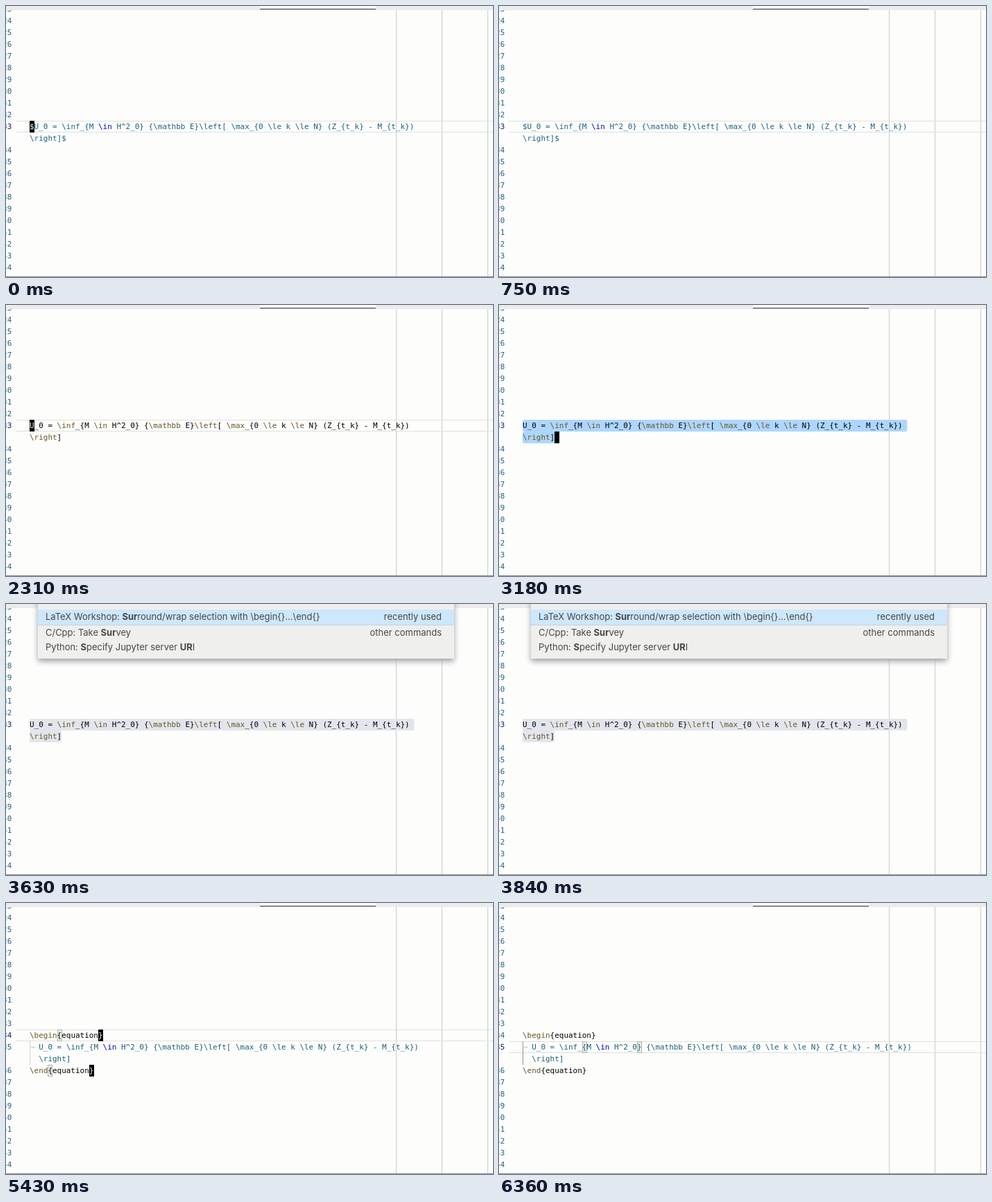
Animation of 702x392 px, one loop 6390 ms. Source, as an HTML page with a canvas:

```html
<!DOCTYPE html>
<html lang="en">
<head>
<meta charset="utf-8">
<title>Wrapping a formula in an environment</title>
<style>
  html, body { margin: 0; width: 702px; height: 392px; overflow: hidden; background: #fdfdfc; }
  canvas { display: block; }
</style>
</head>
<body>
<canvas id="stage" width="702" height="392"></canvas>
<script>
const ctx = document.getElementById('stage').getContext('2d');
const W = 702, H = 392, LOOP = 6390;
const LEFT = 34, CHAR = 6.6, ROW = 17, TOP = -4, FIRST = 23;
const MONO = '10.96px "DejaVu Sans Mono", monospace';
const UI = '12.97px Inter, sans-serif';
const C = {
  bg: '#fdfdfc', bar: '#ececec', ruler: '#cbcbc6', edge: '#8c8c8c',
  number: '#1f6680', active: '#0b216f', line: '#e0e0de',
  ink: '#000', command: '#6a5424', math: '#1c627c', keyword: '#0000c8',
  selected: '#add6ff', inactive: '#e2e5ec', match: '#e7efe6', box: '#b2b2b2',
  guide: '#d3d3d3', activeGuide: '#939393', space: '#c4c4c4',
  panel: '#efefee', focus: '#cde7fc', label: '#464646'
};

// Moments of the editing session, in ms
const T = {
  unwrap: 1300, selectRow: 2400, selectAll: 2760,
  open: 3450, wrap: 4230, type: 4800, key: 68, down: 5760
};
const FORMULA = 'U_0 = \\inf_{M \\in H^2_0} {\\mathbb E}\\left[ \\max_{0 \\le k \\le N} (Z_{t_k} - M_{t_k})';
const TAIL = '\\right]';
const ENV = 'equation';

const rowTop = row => TOP + (row - FIRST) * ROW;
const colX = col => LEFT + col * CHAR;

function rect(x, y, w, h, color) {
  ctx.fillStyle = color;
  ctx.fillRect(x, y, w, h);
}

function text(str, x, y, color, font = MONO, align = 'left') {
  ctx.font = font;
  ctx.textAlign = align;
  ctx.fillStyle = color;
  ctx.fillText(str, x, y);
}

function code(str, row, col = 0, math = false) {
  let at = col;
  for (const part of str.split(/(\\[a-z]+)/)) {
    const isCommand = part[0] === '\\';
    let color = isCommand ? C.command : C.ink;
    if (math) color = part === '\\in' ? C.keyword : C.math;
    text(part, colX(at), rowTop(row) + 12, color);
    at += part.length;
  }
}

function cursor(row, col, char = '') {
  rect(Math.round(colX(col)), rowTop(row), 7, ROW, '#000');
  text(char, colX(col), rowTop(row) + 12, '#fff');
}

function bracket(row, col) {
  const x = Math.round(colX(col)), y = rowTop(row);
  rect(x, y, 7, ROW, C.match);
  ctx.strokeStyle = C.box;
  ctx.lineWidth = 1;
  ctx.strokeRect(x + 0.5, y + 0.5, 6, ROW - 1);
}

function currentLine(row) {
  rect(14, rowTop(row), W - 14, 1, C.line);
  rect(14, rowTop(row) + ROW - 1, W - 14, 1, C.line);
}

function select(row, cols, color) {
  ctx.fillStyle = color;
  ctx.beginPath();
  ctx.roundRect(LEFT, rowTop(row), cols * CHAR, ROW, 2);
  ctx.fill();
}

// The wrapped row after a long line carries no number of its own
function numbers(longLine, current) {
  let row = FIRST;
  for (let n = FIRST; n <= 45; n++) {
    text(n, 8.3, rowTop(row) + 12, n === current ? C.active : C.number, MONO, 'right');
    row += n === longLine ? 2 : 1;
  }
}

function frame() {
  rect(0, 0, W, 6, C.bar);
  rect(366, 0, 167, 4, C.bg);
  rect(366, 4, 167, 1, '#333');
  rect(0, 391, W, 1, C.edge);
}

const blink = (t, since) => (t - since) % 1000 < 500;

function single(t) {
  const wrapped = t < T.unwrap;
  const selecting = t >= T.selectRow;
  const all = t >= T.selectAll;
  const open = t >= T.open;
  numbers(33, 33);
  if (selecting) {
    const color = open ? C.inactive : C.selected;
    select(33, FORMULA.length + (all ? 1 : 0), color);
    if (all) select(34, TAIL.length, color);
  } else {
    currentLine(33);
  }
  code((wrapped ? '$' : '') + FORMULA, 33, 0, wrapped);
  code(TAIL + (wrapped ? '$' : ''), 34, 0, wrapped);
  if (open) return;
  if (all) {
    if (blink(t, T.selectAll)) cursor(34, TAIL.length);
  } else if (selecting) {
    if (blink(t, T.selectRow)) cursor(33, FORMULA.length);
  } else if (blink(t, wrapped ? 0 : T.unwrap)) {
    cursor(33, 0, wrapped ? '$' : 'U');
  }
}

function environment(t) {
  const typed = Math.max(0, Math.min(ENV.length, Math.floor((t - T.type) / T.key) + 1));
  const name = ENV.slice(0, typed);
  const math = typed === ENV.length;
  const moved = t >= T.down;
  numbers(35, moved ? 35 : 34);
  currentLine(moved ? 35 : 34);
  rect(LEFT, rowTop(35), 1, 2 * ROW, moved ? C.activeGuide : C.guide);
  if (moved) {
    bracket(35, 13);
    bracket(35, 25);
  } else {
    bracket(34, 6);
    bracket(37, 4);
  }
  code('\\begin{' + name + '}', 34);
  text('→', LEFT + 1, rowTop(35) + 12, C.space);
  code(FORMULA, 35, 2, math);
  code(TAIL, 36, 2, math);
  code('\\end{' + name + '}', 37);

  if (moved) {
    if (blink(t, T.down)) cursor(35, 14, 'M');
    return;
  }
  const lastKey = T.type + (typed - 1) * T.key;
  if (!typed || blink(t, lastKey)) {
    cursor(34, 7 + typed, '}');
    cursor(37, 5 + typed, '}');
  }
}

// Pieces alternate between regular and bold
function label(pieces, y) {
  let x = 57;
  pieces.forEach((piece, i) => {
    text(piece, x, y, C.label, (i % 2 ? '700 ' : '400 ') + UI);
    x += ctx.measureText(piece).width;
  });
}

function palette() {
  ctx.save();
  ctx.shadowColor = '#a0a0a8';
  ctx.shadowBlur = 8;
  ctx.shadowOffsetY = 4;
  rect(46, -10, 600, 89, C.panel);
  ctx.restore();
  rect(46, 8, 600, 22, C.focus);
  rect(46, 30, 600, 1, '#cccedb');
  label(['LaTeX Workshop: ', 'Sur', 'round/wrap selection with \\begin{}...\\end{}'], 23);
  label(['C/Cpp: Take ', 'Sur', 'vey'], 46);
  label(['Python: ', 'S', 'pecify Jupyter server ', 'UR', 'I'], 67);
  text('recently used', 628, 23, C.label, UI, 'right');
  text('other commands', 628, 46, C.label, UI, 'right');
}

function draw(t) {
  rect(0, 0, W, H, C.bg);
  for (const col of [80, 90, 100]) rect(Math.round(colX(col)), 6, 1, 385, C.ruler);
  if (t < T.wrap) single(t);
  else environment(t);
  frame();
  if (t >= T.open && t < T.wrap) palette();
}

const start = performance.now();
function tick() {
  draw((performance.now() - start) % LOOP);
  requestAnimationFrame(tick);
}
tick();
</script>
</body>
</html>
```
